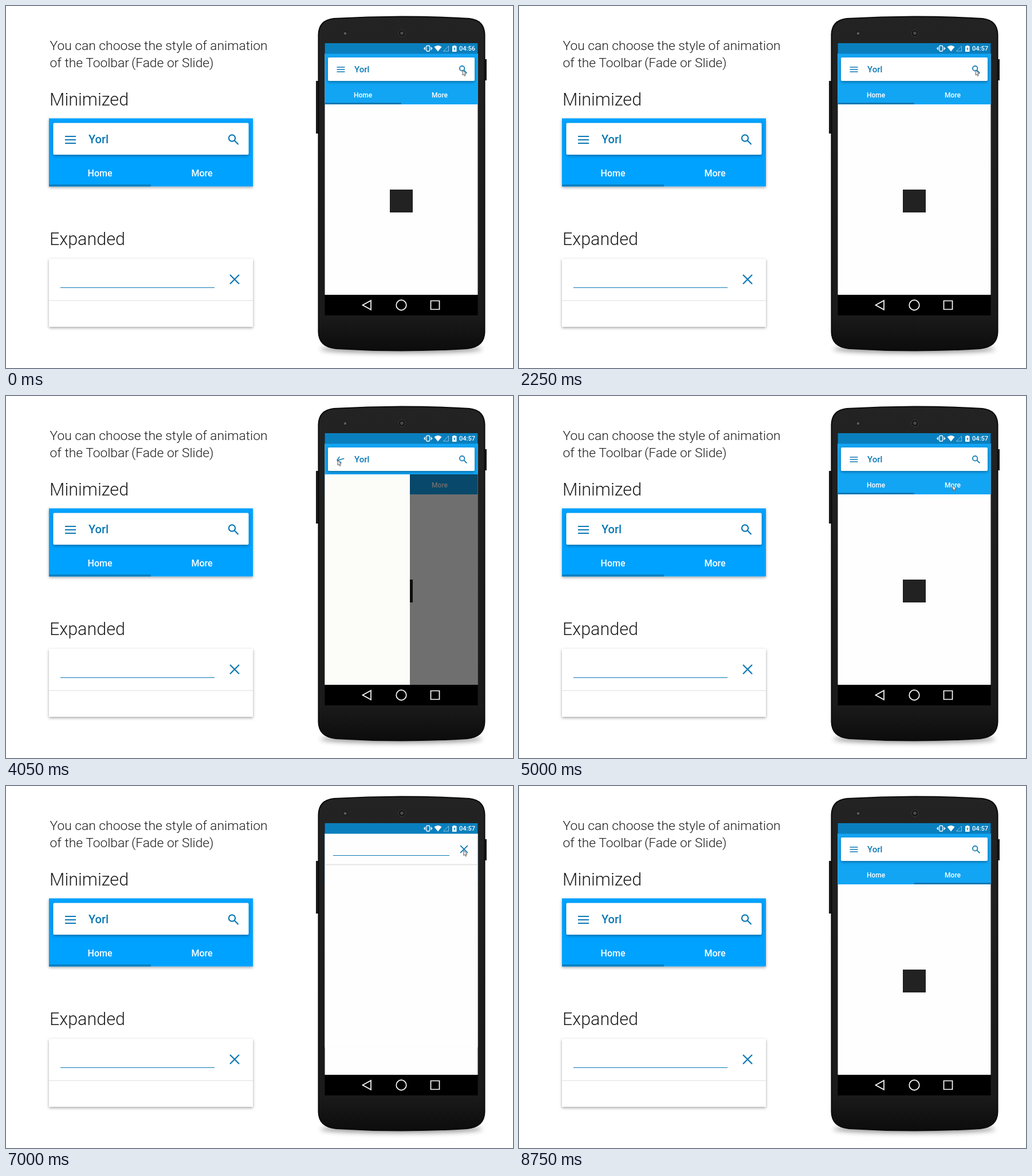
Animation of 885x633 px, one loop 9100 ms. Source, as an HTML page:

```html
<!DOCTYPE html>
<html lang="en">
<head>
<meta charset="utf-8">
<title>Toolbar animation styles</title>
<style>
html, body { margin: 0; width: 100%; height: 100%; overflow: hidden; background: #fff; }
svg { display: block; width: 885px; height: 633px; font-family: Roboto, sans-serif; }
.light { font-weight: 300; fill: #1c1c1c; }
.tab { font-weight: 500; fill: #fff; text-anchor: middle; }
.name { font-weight: 500; fill: #0b78b4; }
.icon { fill: none; stroke: #0b78b4; }
</style>
</head>
<body>
<svg viewBox="0 0 885 633">
  <defs>
    <filter id="shadow" x="-10%" y="-20%" width="120%" height="150%">
      <feDropShadow dx="0" dy="2" stdDeviation="2.5" flood-opacity=".35"/>
    </filter>
    <filter id="blur" x="-10%" y="-100%" width="120%" height="300%"><feGaussianBlur stdDeviation="4"/></filter>
    <linearGradient id="shell" x2="0" y2="1">
      <stop stop-color="#232323"/><stop offset=".5" stop-color="#1d1d1d"/>
      <stop offset=".9" stop-color="#1a1a1a"/><stop offset="1" stop-color="#0c0c0c"/>
    </linearGradient>
    <clipPath id="screen"><path d="M556.5 65H823.5V541H556.5Z"/></clipPath>
    <clipPath id="app"><path d="M556 83H824V505H556Z"/></clipPath>
    <g id="glass"><circle r="5.6" cx="-2.5" cy="-2.5"/><path d="M1.8 1.8L8.5 8.5"/></g>
    <path id="cross" d="M-8-8L8 8M8-8L-8 8"/>
  </defs>

  <!-- left column -->
  <g class="light">
    <text x="76.5" y="77" font-size="22.8">You can choose the style of animation</text>
    <text x="76.5" y="107" font-size="22.8">of the Toolbar <tspan dx="-1.5">(Fade or Slide)</tspan></text>
    <text x="76" y="174" font-size="30.5">Minimized</text>
    <text x="76" y="418" font-size="30.5">Expanded</text>
  </g>
  <path fill="#00a2ff" filter="url(#shadow)" d="M75 196.5H431V315.5H75Z"/>
  <path fill="#0b7fc0" d="M75 312H253V315.5H75Z"/>
  <rect x="82.5" y="204.5" width="341" height="55.5" rx="2" fill="#fff" filter="url(#shadow)"/>
  <path class="icon" stroke-width="2" d="M103 228H122M103 234H122M103 240H122"/>
  <text class="name" x="144" y="240" font-size="20">Yorl</text>
  <use href="#glass" class="icon" stroke-width="2.2" x="397" y="233.5"/>
  <g class="tab" font-size="16"><text x="164" y="298">Home</text><text x="342" y="298">More</text></g>
  <path fill="#fff" filter="url(#shadow)" d="M75 442H431V561H75Z"/>
  <path stroke="#e8e8e8" stroke-width="1.5" d="M75 515H431"/>
  <path class="icon" d="M95 492.5H364"/>
  <use href="#cross" class="icon" stroke-width="2.2" x="399" y="478"/>

  <!-- phone shell -->
  <ellipse cx="690" cy="600" rx="142" ry="7" fill="#000" opacity=".4" filter="url(#blur)"/>
  <path fill="#1b1b1b" d="M541 131H546V223H541ZM835 93H839V130H835Z"/>
  <path fill="url(#shell)" stroke="#0a0a0a" stroke-width="2" d="M545.5 50Q546 25 572 22Q690 15 809 22Q835 25 835.5 50V570Q835 596 805 599Q690 606 576 599Q546 596 545.5 570Z"/>
  <circle cx="691" cy="47.5" r="6" fill="#161616" stroke="#3c3c3c"/>
  <circle cx="691" cy="47.5" r="2.2" fill="#3d3d3d" stroke="#666"/>
  <circle cx="592" cy="48" r="3" fill="#5a5a5a" stroke="#111"/>

  <g clip-path="url(#screen)">
    <path fill="#000" d="M556 65H824V541H556Z"/>
    <g clip-path="url(#app)">
      <path fill="#fefefe" d="M556 83H824V505H556Z"/>
      <g id="pages" fill="#222"><path d="M670 321H710V361H670Z"/><path d="M937 321H977V361H937Z"/></g>
      <g id="tabs">
        <path fill="#12a5f3" d="M556 136H824V172H556Z"/>
        <path id="mark" fill="#0b78b4" d="M556 169H690V172H556Z"/>
        <g class="tab" font-size="12"><text x="623" y="159.5">Home</text><text x="757" y="159.5">More</text></g>
      </g>
      <path id="scrim" d="M556 137H824V505H556Z"/>
      <rect id="drawer" x="556" y="137" height="368" fill="#fcfcf9"/>
      <path fill="#10a5f5" d="M556 83H824V137H556Z"/>
      <rect x="562" y="90" width="256" height="41" rx="2" fill="#fff" filter="url(#shadow)"/>
      <path id="menu" class="icon" stroke-width="1.6"/>
      <text class="name" x="608" y="116" font-size="15">Yorl</text>
      <use href="#glass" class="icon" stroke-width="2.3" transform="translate(798 111) scale(.75)"/>
      <g id="search">
        <rect id="shade" x="556" y="83" width="268"/>
        <rect id="list" x="556" y="137" width="268" fill="#fefefe"/>
        <g id="bar">
          <path fill="#fefefe" d="M556 83H824V137H556Z"/>
          <path stroke="#e6e6e6" stroke-width="2" d="M556 137.5H824"/>
          <path class="icon" d="M571 121.5H774"/>
          <use href="#cross" class="icon" stroke-width="2.2" transform="translate(799.5 110.5) scale(.8)"/>
        </g>
      </g>
    </g>

    <path fill="#0a7fbd" d="M556 65H824V83.5H556Z"/>
    <g fill="none" stroke="#fff" stroke-width="1.3">
      <rect x="734" y="69.5" width="5.5" height="9.5" rx="1"/>
      <path d="M731.5 71.5V77M742 71.5V77M730 73V75.5M743.5 73V75.5"/>
      <path d="M763.5 79H772.5V70Z" stroke-width=".8" opacity=".65"/>
    </g>
    <path fill="#fff" d="M747.5 71.5Q754 66.5 760.5 71.5L754 79.5ZM779 70H781V69H784.5V70H786.5V80H779Z"/>
    <path fill="#0a7fbd" d="M783.5 71.5L781 75.5H782.5L782 78.5L784.7 74.5H783.2Z"/>
    <text id="clock" x="791" y="78" font-size="11" font-weight="500" fill="#fff"></text>
    <g fill="none" stroke="#fff" stroke-width="1.7">
      <path d="M622.5 523L637 515V531Z"/><circle cx="690" cy="523" r="8.8"/><path d="M741.5 515.5H756.5V530.5H741.5Z"/>
    </g>
    <path id="cursor" fill="#eee" stroke="#555" stroke-width=".9" d="M0 0V9L2 7.3L3.5 10.5L5 9.8L3.6 6.8H6.3Z"/>
  </g>
</svg>
<script>
const LOOP = 9100, STEP = 50, OPEN = 165;
const $ = id => document.getElementById(id);
const set = (id, attrs) => { for (const k in attrs) $(id).setAttribute(k, attrs[k]); };
const mix = (a, b, p) => a + (b - a) * p;
const ease = p => p * p * (3 - 2 * p);

// Value at t from alternating time and value arguments.
function track(t, ...keys) {
  if (t <= keys[0]) return keys[1];
  for (let i = 2; i < keys.length; i += 2)
    if (t <= keys[i]) return mix(keys[i - 1], keys[i + 1], ease((t - keys[i - 2]) / (keys[i] - keys[i - 2])));
  return keys[keys.length - 1];
}

// Three bars turning into a back arrow.
function menuPath(p) {
  const edge = s => `M${mix(-7, 1.5, p)} ${s * mix(4, 5.5, p)}L7 ${s * mix(4, 0, p)}`;
  return edge(-1) + `M${mix(-7, -6, p)} 0H${mix(7, 6, p)}` + edge(1);
}

function draw(now) {
  const t = Math.floor(now % LOOP / STEP) * STEP;
  const slide = track(t, 150, 0, 500, 1, 1150, 1, 1500, 0);
  const page = track(t, 5100, 0, 5450, 1);
  const drawer = track(t, 3300, 0, 3350, 32, 3600, 150, 3900, OPEN, 4000, OPEN, 4050, 149, 4350, 0);
  const dim = track(t, 3350, 0, 3700, .58, 4000, .58, 4050, .56, 4350, 0);
  const drop = 9 * slide + track(t, 6900, 0, 7350, 117, 7750, 117, 8250, 0);

  set('pages', { transform: `translate(${-267 * page} ${drop})` });
  set('tabs', { transform: `translate(0 ${-36 * slide})` });
  set('mark', { transform: `translate(${134 * page} 0)` });
  set('scrim', { opacity: dim });
  set('drawer', { width: drawer });
  set('menu', { d: menuPath(drawer / OPEN), transform: `translate(584.5 111) rotate(${180 * drawer / OPEN})` });

  const fading = t >= 6300;
  const alpha = !fading ? 1 : track(t, 6300, .15, 6600, 1, 7550, 1, 7750, .1, 7800, 0);
  const bottom = !fading ? 137 : track(t, 6300, 397, 6600, 450, 6900, 450, 7350, 505, 7550, 505, 7750, 247, 7800, 137);
  set('search', { transform: `translate(0 ${fading ? 0 : -56 * (1 - slide)})` });
  set('shade', { height: bottom - 83, opacity: fading ? Math.min(alpha, .14) : 0 });
  set('list', { height: bottom - 137, opacity: alpha * alpha });
  set('bar', { opacity: alpha });

  $('clock').textContent = t < 2250 ? '04:56' : '04:57';
  const x = track(t, 2650, 797, 3200, 579, 4450, 579, 4900, 757, 5500, 757, 6050, 799, 6900, 799, 7350, 797);
  const y = track(t, 4450, 112, 4900, 156, 5500, 156, 6050, 112, 6900, 112, 7350, 116);
  set('cursor', { transform: `translate(${x} ${y})`, visibility: t < 8500 ? 'visible' : 'hidden' });
}

function frame() {
  draw(performance.now());
  requestAnimationFrame(frame);
}
frame();
</script>
</body>
</html>
```
